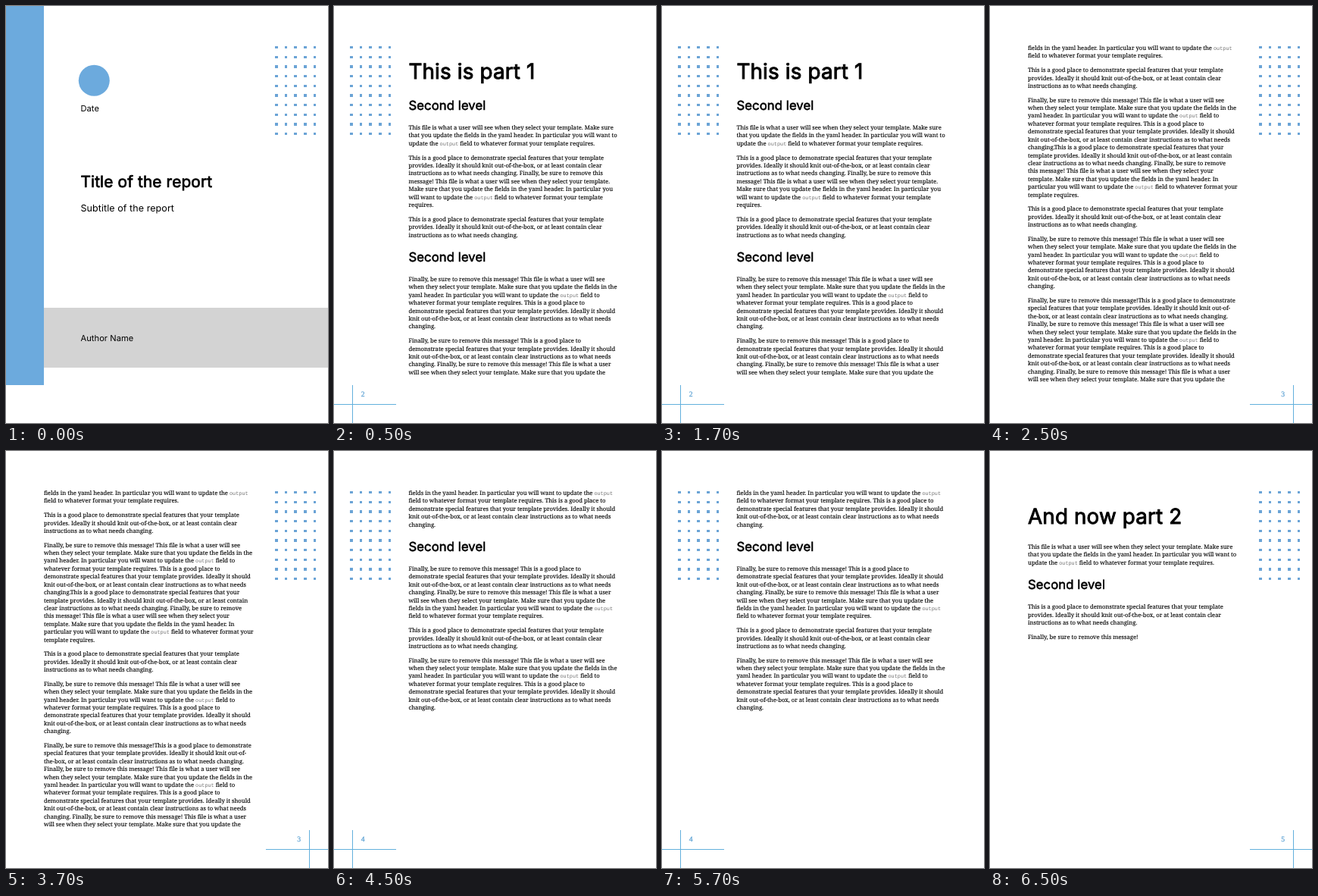
Write an HTML page that moves like this. It is 425 px wide and 550 px high and loops after 8 s.

```html
<!DOCTYPE html>
<html lang="en">
<head>
<meta charset="utf-8">
<title>Report template</title>
<style>
  html, body { margin: 0; width: 100%; height: 100%; overflow: hidden; background: #fff; }
  svg { display: block; width: 100vw; height: 100vh; text-rendering: geometricPrecision; }
  text { white-space: pre; }
  .sans { font-family: Inter, sans-serif; font-optical-sizing: none; letter-spacing: .006em; }
  .head { stroke: #000; stroke-width: .034em; }
  .body { font: 7.69px "Noto Serif", serif; stroke: #000; stroke-width: .12px; }
  .code { font: 6.85px "Liberation Mono", monospace; fill: #6e6e6e; stroke: none; }
  .folio { font: 9.72px "Liberation Serif", serif; fill: #5fa3d4; stroke: #5fa3d4; stroke-width: .25px; }
</style>
</head>
<body>
<svg id="stage" viewBox="0 0 425 550"></svg>
<script>
const NS = 'http://www.w3.org/2000/svg';
const BLUE = '#6caadd';
const DOT = '#6ba4d6';
const LOOP = 8000;
const LEADING = 10.41;
const stage = document.getElementById('stage');

// Lines are split by "|", code words are wrapped in backticks.
const place = 'This is a good place to demonstrate special features that your template|' +
  'provides. Ideally it should knit out-of-the-box, or at least contain clear|' +
  'instructions as to what needs changing.';
const intro = 'This file is what a user will see when they select your template. Make sure|' +
  'that you update the fields in the yaml header. In particular you will want to|' +
  'update the `output` field to whatever format your template requires.';
const middle = 'when they select your template. Make sure that you update the fields in the|' +
  'yaml header. In particular you will want to update the `output` field to|' +
  'whatever format your template requires. This is a good place to|' +
  'demonstrate special features that your template provides. Ideally it should|' +
  'knit out-of-the-box, or at least contain clear instructions as to what needs|';
const finalStart =
  'Finally, be sure to remove this message! This file is what a user will see|' + middle;
const final = finalStart + 'changing.';
const repeat = 'changing. Finally, be sure to remove this message! This file is what a user|' +
  'will see when they select your template. Make sure that you update the';
const reminder = 'Finally, be sure to remove this message! This is a good place to|' +
  'demonstrate special features that your template provides. Ideally it should|' +
  'knit out-of-the-box, or at least contain clear instructions as to what needs|' + repeat;
const fields = 'fields in the yaml header. In particular you will want to update the `output`|' +
  'field to whatever format your template requires.';
const second = { h2: 'Second level' };

const pages = [
  [{ h1: 'This is part 1' }, second, intro,
    'This is a good place to demonstrate special features that your template|' +
    'provides. Ideally it should knit out-of-the-box, or at least contain clear|' +
    'instructions as to what needs changing. Finally, be sure to remove this|' +
    'message! This file is what a user will see when they select your template.|' +
    'Make sure that you update the fields in the yaml header. In particular you|' +
    'will want to update the `output` field to whatever format your template|' +
    'requires.',
    place, second, final, reminder],
  [fields, place,
    finalStart +
    'changing.This is a good place to demonstrate special features that your|' +
    'template provides. Ideally it should knit out-of-the-box, or at least contain|' +
    'clear instructions as to what needs changing. Finally, be sure to remove|' +
    'this message! This file is what a user will see when they select your|' +
    'template. Make sure that you update the fields in the yaml header. In|' +
    'particular you will want to update the `output` field to whatever format your|' +
    'template requires.',
    place, final,
    'Finally, be sure to remove this message!This is a good place to demonstrate|' +
    'special features that your template provides. Ideally it should knit out-of-|' +
    'the-box, or at least contain clear instructions as to what needs changing.|' +
    'Finally, be sure to remove this message! This file is what a user will see|' +
    middle + repeat],
  [fields + ' This is a good place to|' +
    'demonstrate special features that your template provides. Ideally it should|' +
    'knit out-of-the-box, or at least contain clear instructions as to what needs|' +
    'changing.',
    second, reminder + '|' + fields, place, final],
  [{ h1: 'And now part 2' }, intro, second, place,
    'Finally, be sure to remove this message!']
];

function add(parent, tag, attrs, text) {
  const el = document.createElementNS(NS, tag);
  for (const key in attrs) el.setAttribute(key, attrs[key]);
  if (text) el.textContent = text;
  parent.appendChild(el);
  return el;
}

function sans(parent, x, y, size, text, bold) {
  add(parent, 'text', { x, y, 'font-size': size, class: bold ? 'sans head' : 'sans' }, text);
}

function bodyLine(parent, x, y, line) {
  const el = add(parent, 'text', { x, y, class: 'body' });
  line.split('`').forEach((part, i) => {
    if (part) add(el, 'tspan', i % 2 ? { class: 'code' } : {}, part);
  });
}

function dots(parent, cx) {
  for (let row = 0; row < 10; row++)
    for (let col = 0; col < 5; col++)
      add(parent, 'rect', {
        x: cx + col * 12.65 - 1.75, y: 54.7 + row * 12.65 - 1.75,
        width: 3.5, height: 3.5, fill: DOT, 'shape-rendering': 'crispEdges'
      });
}

function cover() {
  const g = add(stage, 'g', {});
  add(g, 'rect', { width: 50, height: 500, fill: BLUE });
  add(g, 'rect', { x: 50, y: 398, width: 375, height: 79, fill: '#d3d3d3' });
  add(g, 'circle', { cx: 116.3, cy: 98.3, r: 20.5, fill: BLUE });
  dots(g, 356.8);
  sans(g, 98.43, 139, 11.11, 'Date');
  sans(g, 98.43, 239.4, 20.83, 'Title of the report', true);
  sans(g, 98.43, 271, 12.5, 'Subtitle of the report');
  sans(g, 98.43, 442, 11.11, 'Author Name');
  return g;
}

// Stacks blocks from the top margin, collapsing the space between neighbours.
function flow(g, x, blocks) {
  let y = 50, lastGap = 0;
  blocks.forEach((block, i) => {
    const isText = typeof block === 'string';
    const size = block.h1 ? 27.78 : 16.67;
    const gap = isText ? 8.3 : size * (block.h1 ? 0.67 : 0.83);
    if (i || !isText) y += Math.max(gap, lastGap);
    lastGap = gap;
    if (isText) {
      for (const line of block.split('|')) {
        bodyLine(g, x, y + 8, line);
        y += LEADING;
      }
    } else {
      sans(g, x, y + size * 0.97, size, block.h1 || block.h2, true);
      y += size * 1.215;
    }
  });
}

function page(blocks, i) {
  const g = add(stage, 'g', {});
  const left = i % 2 === 0;
  dots(g, left ? 22.8 : 356.8);
  flow(g, left ? 98.43 : 50, blocks);
  add(g, 'path', {
    d: left ? 'M24.5 500V550M0 525.5H82' : 'M400.5 500V550M343 525.5H425',
    stroke: '#62b0dc'
  });
  add(g, 'text', {
    x: left ? 35.8 : 389.2, y: 515, class: 'folio',
    'text-anchor': left ? 'start' : 'end'
  }, String(i + 2));
  return g;
}

const scenes = [cover(), ...pages.map(page)];
const starts = [0, 500, 2500, 4500, 6500];

function draw(time) {
  const t = time % LOOP;
  const current = starts.filter(s => s <= t).length - 1;
  scenes.forEach((g, i) => g.setAttribute('display', i === current ? 'inline' : 'none'));
}

const begin = performance.now();
function tick() {
  draw(performance.now() - begin);
  requestAnimationFrame(tick);
}
tick();
</script>
</body>
</html>
```
